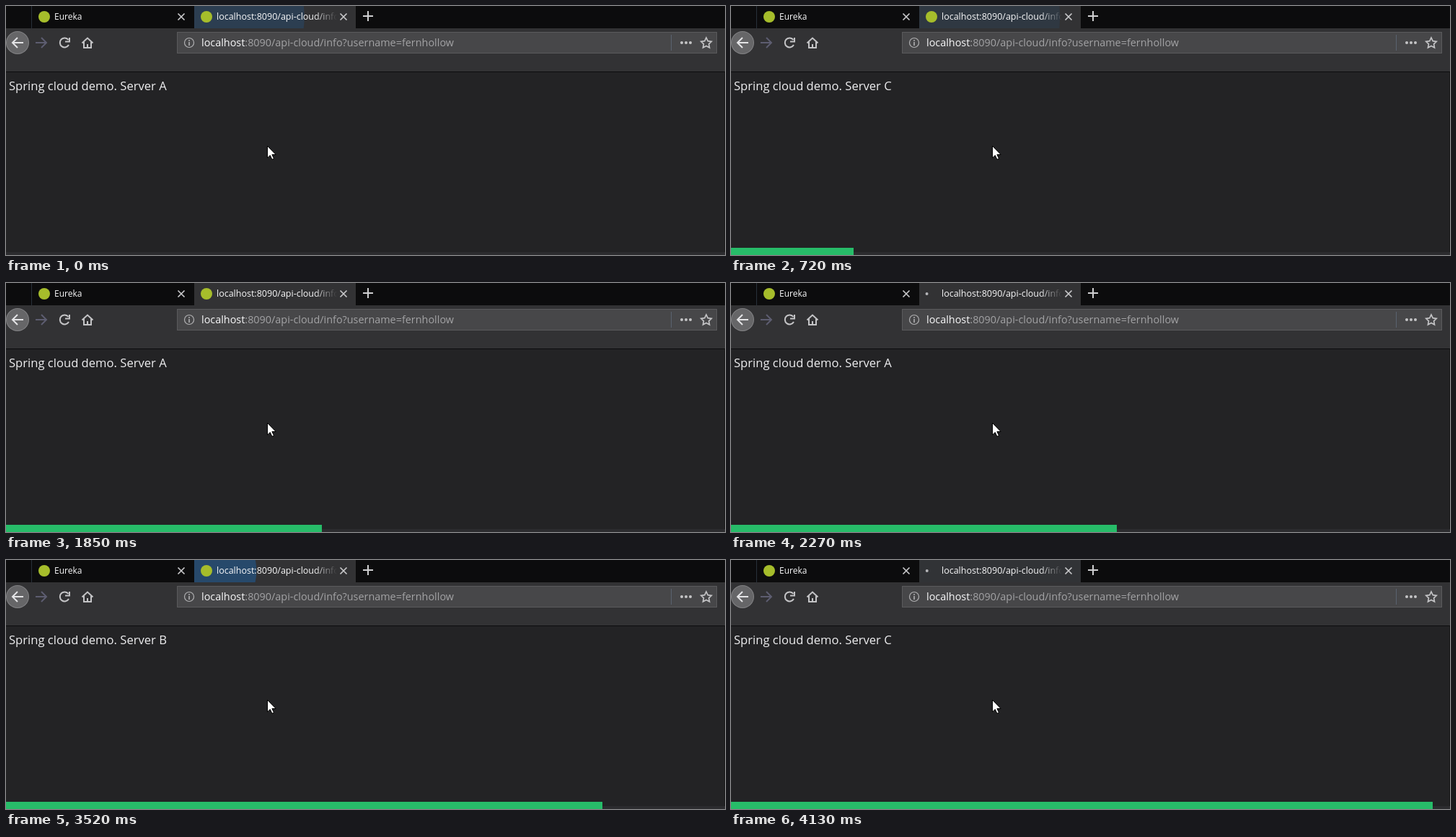
Animation of 997 by 346 pixels, one loop 4240 ms. Source, as an HTML page with a canvas:

```html
<!DOCTYPE html>
<html lang="en">
<head>
<meta charset="utf-8">
<title>Load balancing demo</title>
<style>
  html, body { margin: 0; width: 100%; height: 100%; overflow: hidden; background: #232325; }
  canvas { display: block; }
</style>
</head>
<body>
<canvas id="stage" width="997" height="346"></canvas>
<script>
const ctx = document.getElementById('stage').getContext('2d');
const LOOP = 4240, STEPS = 41;

// How long each step holds, in ms
const holds = [
  110, 100, 100, 100, 100, 100, 110, 100, 100, 110, 100, 110, 100, 110,
  100, 100, 100, 100, 110, 100, 110, 100, 110, 90, 110, 110, 100, 110,
  100, 100, 110, 100, 110, 100, 120, 80, 110, 100, 100, 100, 110];

// Each page load: server, spinner start, text paint, burst start
const loads = [
  ['A', -400, -300, -168],
  ['C', 250, 410, 476],
  ['B', 850, 930, 1100],
  ['A', 1500, 1650, 1850],
  ['C', 2250, 2470, 2690],
  ['B', 3080, 3210, 3442],
  ['A', 3600, 3720, 3800],
  ['C', 4080, 4130, Infinity]
].map(([server, spin, paint, burst]) => ({ server, spin, paint, burst }));

function rect(x, y, w, h, color) {
  ctx.fillStyle = color;
  ctx.fillRect(x, y, w, h);
}

function disc(x, y, r, color) {
  ctx.fillStyle = color;
  ctx.beginPath();
  ctx.arc(x, y, r, 0, 7);
  ctx.fill();
}

function stroke(d, color, width = 2) {
  ctx.strokeStyle = color;
  ctx.lineWidth = width;
  ctx.stroke(new Path2D(d));
}

function text(str, x, y, size, color) {
  ctx.font = `${size}px "Open Sans", "Noto Sans", sans-serif`;
  ctx.fillStyle = color;
  ctx.fillText(str, x, y);
  return x + ctx.measureText(str).width;
}

function drawTabs(time) {
  rect(0, 0, 997, 31, '#0c0c0d');
  rect(35, 0, 1, 31, '#28303a');
  rect(261, 0, 224, 31, '#323234');

  const burst = loads.filter(l => l.burst <= time).pop().burst;
  const age = (time - burst) / 375;
  if (age < 1) {
    const grow = 1 - (1 - age) ** 1.7;
    ctx.save();
    ctx.beginPath();
    ctx.rect(261, 0, 224, 31);
    ctx.clip();
    disc(277, 15, 215 * grow, `rgba(10,132,255,${0.4 * (1 - grow)})`);
    ctx.restore();
  }

  disc(53, 15, 8, '#a6bd2b');
  const loading = loads.find(l => l.spin <= time && time < l.burst);
  if (loading) {
    const phase = (time - loading.spin) / 1050 * 2 * Math.PI;
    disc(271.5 + 6 * (1 - Math.cos(phase)), 15, 2, '#b5b5b8');
  } else {
    disc(278, 15, 8, '#a6bd2b');
  }

  text('Eureka', 67, 19, 12, '#f9f9fa');
  const fade = ctx.createLinearGradient(428, 0, 459, 0);
  fade.addColorStop(0, '#f9f9fa');
  fade.addColorStop(1, 'rgba(249,249,250,0)');
  text('localhost:8090/api-cloud/info', 292, 19, 12.5, fade);
  for (const x of [243, 468]) {
    stroke(`M${x - 4.5} 10.5l9 9m0-9l-9 9`, '#c8c8ca', 1.7);
  }
  stroke('M495 14h14m-7-7v14', '#d0d0d2');
}

function drawToolbar() {
  rect(0, 31, 997, 60, '#323234');
  rect(0, 91, 997, 1, '#0c0c0d');

  const icon = '#c4c4c6';
  disc(16, 51, 16, '#838385');
  disc(16, 51, 15, '#666668');
  stroke('M24 51H9m7-7l-7 7 7 7', '#e4e4e6');
  stroke('M41 51h15m-7-7l7 7-7 7', '#5d5d70');
  stroke('M86.5 47A6.5 6.5 0 1 0 87 54M88 44v5.5h-6', icon);
  stroke('M105.5 51.5l7.5-7 7.5 7M108 50v8h10v-8M113 58v-5', icon);

  rect(237, 36, 749, 30, '#5a5a5c');
  rect(238, 37, 747, 28, '#474749');
  stroke('M247.5 51a6.5 6.5 0 1 0 13 0a6.5 6.5 0 1 0-13 0', '#b1b1b3', 1.2);
  rect(253.2, 47, 1.6, 1.8, '#b1b1b3');
  rect(253.2, 50, 1.6, 5, '#b1b1b3');
  const pathX = text('localhost', 271, 56, 14.4, '#f9f9fa');
  text(':8090/api-cloud/info?username=fernhollow', pathX, 56, 14.4, '#a3a3a5');
  rect(922, 40, 1, 22, '#59636f');
  for (const x of [937, 943, 949]) disc(x, 51, 2, icon);
  stroke('M971 44l2.2 4.6 5 .7-3.6 3.5.9 5-4.5-2.4-4.5 2.4.9-5-3.6-3.5 5-.7z', icon, 1.7);
}

function drawPage(time, step) {
  rect(0, 92, 997, 254, '#232325');
  rect(0, 342, 997, 4, '#2c2c2f');
  rect(996, 92, 1, 250, '#161617');
  const { server } = loads.filter(l => l.paint <= time).pop();
  text(`Spring cloud demo. Server ${server}`, 4, 117, 16.6, '#eeeef0');

  const cursor = 'M362.5 194.5v16.5l3.8-3.5 2.6 5.8 2.6-1.2-2.6-5.6h5.2z';
  ctx.fillStyle = '#fff';
  ctx.fill(new Path2D(cursor));
  stroke(cursor, '#000', 1);
  rect(0, 336, Math.round(997 * step / STEPS), 10, '#27bc69');
}

function draw(now) {
  const elapsed = now % LOOP;
  let step = 0, time = 0;
  while (step < STEPS - 1 && time + holds[step] <= elapsed) time += holds[step++];
  drawTabs(time);
  drawToolbar();
  drawPage(time, step);
}

const start = performance.now();
function tick() {
  draw(performance.now() - start);
  requestAnimationFrame(tick);
}
tick();
</script>
</body>
</html>
```
